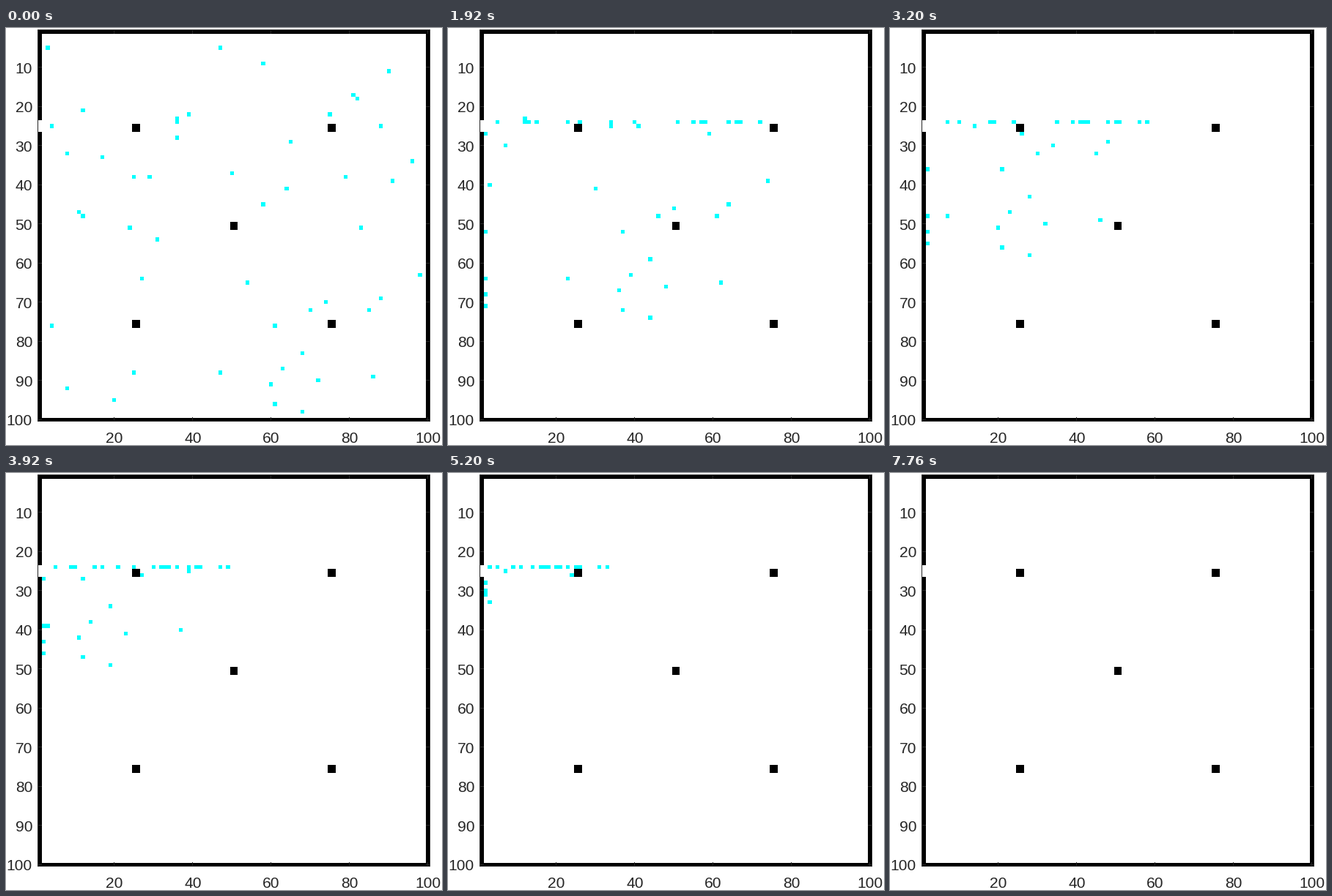
These frames come from a looping animation (595 by 570 pixels, 7.84 s). A matplotlib script:

```python
import numpy as np
import matplotlib.pyplot as plt
from matplotlib.animation import FuncAnimation

W, H, DPI = 595, 570, 100
N, STEPS = 100, 98
LEFT, TOP, CELL = 43.45, 2.95, 5.35
EXIT_X, EXIT_Y = 1, 24
GREY = 38
PALETTE = np.array([[255, 255, 255], [0, 0, 0], [0, 255, 255]], np.uint8)
FLOOR, WALL, PERSON = range(3)

XS = [3, 47, 58, 90, 81, 82, 12, 39, 75, 36, 36, 4, 88, 36, 65, 8, 17,
      96, 50, 25, 29, 79, 91, 64, 58, 11, 12, 24, 83, 31, 98, 27, 54, 88,
      74, 70, 85, 4, 61, 68, 63, 25, 47, 86, 72, 60, 8, 20, 61, 68]
YS = [5, 5, 9, 11, 17, 18, 21, 22, 22, 23, 24, 25, 25, 28, 29, 32, 33,
      34, 37, 38, 38, 38, 39, 41, 45, 47, 48, 51, 51, 54, 63, 64, 65, 69,
      70, 72, 72, 76, 76, 83, 87, 88, 88, 89, 90, 91, 92, 95, 96, 98]


def make_room():
    """Room indexed [y, x], both counted from 1."""
    room = np.full((N + 1, N + 1), FLOOR)
    room[[1, N], :] = WALL
    room[:, [1, N]] = WALL
    for x, y in [(25, 25), (75, 25), (50, 50), (25, 75), (75, 75)]:
        room[y:y + 2, x:x + 2] = WALL
    room[EXIT_Y:EXIT_Y + 3, EXIT_X] = FLOOR
    return room


def options(x, y):
    """Moves towards the exit, best first."""
    dx, dy = EXIT_X - x, EXIT_Y - y
    sx, sy = int(np.sign(dx)), int(np.sign(dy))
    if abs(dx) >= abs(dy):
        return [(sx, sy), (sx, 0), (sx, 1), (0, 1)]
    return [(sx, sy), (0, sy)]


def walk(room):
    """Positions at every step; the nearest people move first."""
    people = sorted(zip(XS, YS),
                    key=lambda p: np.hypot(p[0] - EXIT_X, p[1] - EXIT_Y))
    history = [list(people)]
    for _ in range(STEPS - 1):
        taken = set(people)
        moved = []
        for x, y in people:
            taken.discard((x, y))
            spot = (x, y)
            for dx, dy in options(x, y):
                nxt = (x + dx, y + dy)
                if room[nxt[1], nxt[0]] == FLOOR and nxt not in taken:
                    spot = nxt
                    break
            if spot[0] > EXIT_X:
                taken.add(spot)
                moved.append(spot)
        people = moved
        history.append(people)
    return history


def centre(start, cell):
    return start + (cell - 0.5) * CELL


room = make_room()
history = walk(room)

# Stage pixels covered by the room, and the cell under each of them
x0, x1 = 43, 579
y0, y1 = 2, 538
cols = np.floor((np.arange(x0, x1) + 0.5 - LEFT) / CELL).astype(int) + 1
rows = np.floor((np.arange(y0, y1) + 0.5 - TOP) / CELL).astype(int) + 1
lookup = np.ix_(rows.clip(1, N), cols.clip(1, N))


def draw_axes(img):
    img[[y0, y1 - 1], x0:x1] = GREY
    img[y0:y1, [x0, x1 - 1]] = GREY
    for v in range(20, N + 1, 20):
        x = int(centre(LEFT, v))
        img[y0:y0 + 6, x] = GREY
        img[y1 - 6:y1, x] = GREY
    for v in range(10, N + 1, 10):
        y = int(centre(TOP, v))
        img[y, x0:x0 + 6] = GREY
        img[y, x1 - 6:x1] = GREY


def render(step):
    grid = room.copy()
    for x, y in history[step]:
        grid[y, x] = PERSON
    img = np.full((H, W, 3), 255, np.uint8)
    img[y0:y1, x0:x1] = PALETTE[grid[lookup]]
    draw_axes(img)
    return img


fig = plt.figure(figsize=(W / DPI, H / DPI), dpi=DPI, facecolor="white")
ax = fig.add_axes([0, 0, 1, 1])
ax.axis("off")
view = ax.imshow(render(0), extent=(0, W, H, 0), interpolation="nearest",
                 aspect="auto")

font = dict(family="Liberation Sans", size=21 * 72 / DPI, color="0.15")
for v in range(20, N + 1, 20):
    ax.text(centre(LEFT, v), 567, str(v), ha="center", va="baseline", **font)
for v in range(10, N + 1, 10):
    ax.text(36, centre(TOP, v) + 8, str(v), ha="right", va="baseline", **font)


def update(step):
    view.set_data(render(step))
    return [view]


anim = FuncAnimation(fig, update, frames=STEPS, interval=80, repeat=True,
                     repeat_delay=0, blit=False)
plt.show()
```
